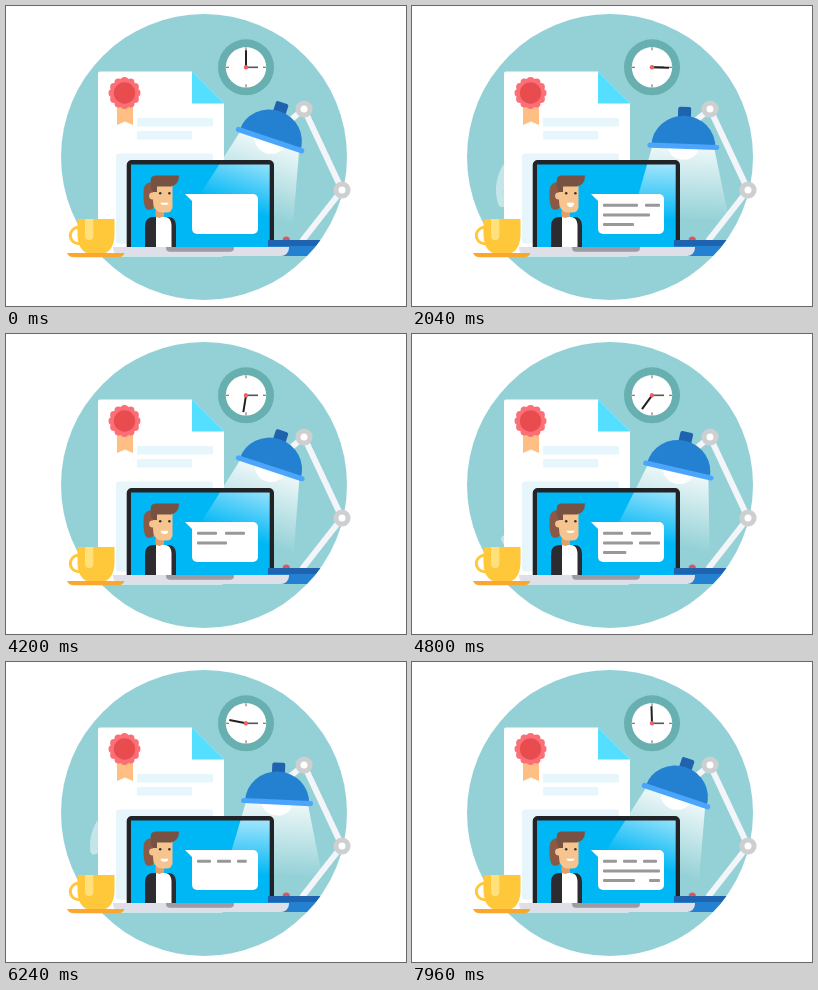
Recreate the animation shown at these times as an HTML page with a canvas. Size 400 px wide and 300 px high, loop 8 s.

```html
<!DOCTYPE html>
<html lang="en">
<head>
<meta charset="utf-8">
<title>Desk with lamp</title>
<style>
html, body { margin: 0; width: 100%; height: 100%; overflow: hidden; background: #fff; }
canvas { display: block; width: 400px; height: 300px; }
</style>
</head>
<body>
<canvas id="stage"></canvas>
<script>
const LOOP = 8000, TAU = Math.PI * 2;
const canvas = document.getElementById('stage');
const ratio = window.devicePixelRatio || 1;
canvas.width = 400 * ratio;
canvas.height = 300 * ratio;
const c = canvas.getContext('2d');

function fill(color) { c.fillStyle = color; c.fill(); }

function disc(x, y, r, color) {
  c.beginPath();
  c.arc(x, y, r, 0, TAU);
  fill(color);
}

function box(x, y, w, h, r, color) {
  c.beginPath();
  c.roundRect(x, y, w, h, r);
  fill(color);
}

function poly(points, color) {
  c.beginPath();
  points.forEach(p => c.lineTo(p[0], p[1]));
  c.closePath();
  fill(color);
}

function line(x1, y1, x2, y2, width, color, cap = 'butt') {
  c.beginPath();
  c.moveTo(x1, y1);
  c.lineTo(x2, y2);
  c.lineWidth = width;
  c.lineCap = cap;
  c.strokeStyle = color;
  c.stroke();
}

function shape(path, color) {
  c.fillStyle = color;
  c.fill(new Path2D(path));
}

const clamp = v => Math.max(0, Math.min(1, v));

function drawPaper() {
  shape('M94 65.5H186L218 97.5V248Q218 250.5 215.5 250.5H94Q92 250.5 92 248V67.5Q92 65.5 94 65.5Z', '#fff');
  poly([[186, 65.5], [186, 97.5], [218, 97.5]], '#54deff');
  const tint = '#e6f6fb';
  box(131, 112, 76, 8.5, 1, tint);
  box(131, 125, 55, 8.5, 1, tint);
  box(110, 147.5, 97, 90, 3, tint);
  poly([[111, 96], [127, 96], [127, 119], [119, 115.5], [111, 119]], '#ffbe84');
  for (let i = 0; i < 12; i++) {
    const a = i * TAU / 12;
    disc(118.5 + 12 * Math.cos(a), 87 + 12 * Math.sin(a), 4, '#fb7076');
  }
  disc(118.5, 87, 13, '#fb7076');
  disc(118.5, 87, 10.7, '#e94c4f');
}

function drawClock(t) {
  c.save();
  c.translate(240, 61.3);
  disc(0, 0, 28, '#68afb0');
  disc(0, 0, 20.2, '#fff');
  for (let i = 0; i < 4; i++) {
    line(0, -20, 0, -17, 1, '#666');
    c.rotate(TAU / 4);
  }
  line(0, 0, 12, 0, 1.6, '#555');
  c.rotate(TAU * t / LOOP);
  line(0, 0, 0, -17, 2, '#222');
  disc(0, 0, 2.2, '#f0605f');
  c.restore();
}

// Each puff grows upward from the cup, then its tail follows.
function drawSteam(t) {
  const u = t % 4000;
  const top = 212 - 50 * clamp((u - 680) / 830);
  const tail = 212 - 50 * clamp((u - 1700) / 1150);
  if (tail - top < 0.5) return;
  c.beginPath();
  for (let y = tail; y > top; y--) c.lineTo(88 + 0.012 * (y - 184) ** 2, y);
  c.lineWidth = 8;
  c.lineCap = c.lineJoin = 'round';
  c.strokeStyle = 'rgba(255,255,255,.46)';
  c.stroke();
}

// Runs a drawing in the tilted lamp head, with the rim's centre at 0,0.
function inHead(t, draw) {
  const swing = (1 - Math.cos(Math.PI * t / 2000)) / 2;
  c.save();
  c.translate(289, 112);
  c.rotate((18.6 - 16.5 * swing) * Math.PI / 180);
  c.translate(-16.6, 28.9);
  draw();
  c.restore();
}

function drawBeam() {
  const g = c.createLinearGradient(0, 0, 0, 74);
  g.addColorStop(0, 'rgba(255,255,255,.85)');
  g.addColorStop(1, 'rgba(255,255,255,0)');
  poly([[-31, 1], [31, 1], [49, 74], [-49, 74]], g);
}

function drawHead() {
  c.beginPath();
  c.ellipse(0, 0, 15.5, 13.5, 0, 0, Math.PI);
  fill('#fff');
  box(-6.5, -39.5, 13, 15, 2, '#1f62ad');
  c.beginPath();
  c.ellipse(0, 0, 32, 30.5, 0, Math.PI, TAU);
  fill('#2480d0');
  box(-36, -2.6, 72, 5.2, 2.6, '#4ba6fb');
}

function drawLampBase() {
  c.save();
  c.beginPath();
  c.arc(198, 151, 143, 0, TAU);
  c.clip();
  disc(280.3, 234, 3.6, '#e0525c');
  c.fillStyle = '#2480d0';
  c.fillRect(262, 234, 80, 16);
  c.fillStyle = '#1f62ad';
  c.fillRect(262, 234, 80, 6);
  c.restore();
}

function drawArms() {
  line(298, 103, 282, 116, 6, '#f4f5f9');
  line(298, 103, 336, 184, 6, '#f4f5f9');
  line(336, 184, 296, 235, 6, '#f4f5f9');
  for (const [x, y] of [[298, 103], [336, 184]]) {
    disc(x, y, 8.6, '#cecfd1');
    disc(x, y, 3.5, '#fff');
  }
}

function drawSpeaker(t) {
  shape('M147 176Q137 176 137.5 187Q137 201 141 203.5Q147 205 148 200V176Z', '#8b5a46');
  shape('M150 200H158V214H150Z', '#e0a270');
  shape('M139 241V220Q139 211 148 211H162Q170 211 170 220V241Z', '#2c2b2f');
  shape('M150 211H160Q165 212 165.5 219V241H150Z', '#fff');
  shape('M149.5 205H158V209Q156 212 153.5 212Q150.5 212 149.5 209Z', '#dfa06e');
  shape('M147 179H166.5V201Q166 206.5 160 206.5H156Q147 206 147 195Z', '#f6c48f');
  disc(146.5, 190, 3.4, '#f6c48f');
  shape('M145 172Q146 169.5 150 169.5H173Q173 179 165 180.5H151V186H147Q143.5 181 145 172Z', '#775242');
  disc(154.2, 187.2, 1.25, '#333');
  disc(163.4, 187.2, 1.25, '#333');
  const open = (1 - Math.cos(TAU * t / 800)) / 2;
  c.beginPath();
  c.ellipse(158.5, 196.8, 4 - 0.5 * open, 2.2 + 2.2 * open, 0, 0, Math.PI);
  fill('#fff');
}

const ROW_TIME = 500;
const NOTES = [
  { start: 440, end: 3000, rows: [[[191, 226], [233, 248]], [[191, 238]], [[191, 222]]] },
  { start: 3425, end: 5540, rows: [[[191, 211], [219, 239]], [[191, 221], [227, 248]], [[191, 222]]] },
  { start: 5780, end: LOOP, rows: [[[191, 205], [211, 225], [231, 245]], [[191, 248]], [[191, 223], [237, 248]]] }
];

function drawBubble(t) {
  box(186, 188, 66, 40, 5, '#fff');
  poly([[179, 188], [194, 188], [194, 200], [186, 195]], '#fff');
  const note = NOTES.find(n => t >= n.start && t < n.end);
  if (!note) return;
  note.rows.forEach((row, i) => {
    const last = row[row.length - 1][1];
    const pen = 191 + (last - 191) * clamp((t - note.start) / ROW_TIME - i);
    for (const [from, to] of row) {
      const w = Math.min(pen, to) - from;
      if (w > 0) box(from, 197.8 + i * 9.6, w, 3, Math.min(1, w / 2), '#98989b');
    }
  });
}

function drawLaptop(t) {
  c.fillStyle = '#00b7f5';
  c.fillRect(123, 156, 143, 86);
  drawSpeaker(t);
  inHead(t, drawBeam);
  c.beginPath();
  c.roundRect(120.7, 154, 147.3, 87.5, [5, 5, 0, 0]);
  c.rect(125, 158.5, 138.7, 83);
  c.fillStyle = '#222326';
  c.fill('evenodd');
  drawBubble(t);
}

function drawLaptopBase() {
  box(107, 241, 176, 9, [0, 0, 8, 8], '#dfe0e7');
  box(160, 241, 68, 4.8, [0, 0, 4, 4], '#9b9ca1');
}

function drawCup() {
  c.beginPath();
  c.arc(72.5, 229.5, 8.2, 0, TAU);
  c.lineWidth = 3;
  c.strokeStyle = '#ffc83a';
  c.stroke();
  shape('M71.5 213H108.5V229Q108 249 90 249Q72 249 71.5 229Z', '#ffc83a');
  box(79, 213, 8.3, 21, [0, 0, 4, 4], '#ffe07a');
  shape('M61 247H118.5Q117 251.3 112 251.3H68Q63 251.3 61 247Z', '#f9a72f');
}

function draw(t) {
  c.setTransform(ratio, 0, 0, ratio, 0, 0);
  c.fillStyle = '#fff';
  c.fillRect(0, 0, 400, 300);
  disc(198, 151, 143, '#93d1d7');
  drawClock(t);
  drawPaper();
  drawSteam(t);
  drawLaptop(t);
  drawArms();
  drawLampBase();
  inHead(t, drawHead);
  drawLaptopBase();
  drawCup();
}

const begin = performance.now();
function tick() {
  draw((performance.now() - begin) % LOOP);
  requestAnimationFrame(tick);
}
tick();
</script>
</body>
</html>
```
